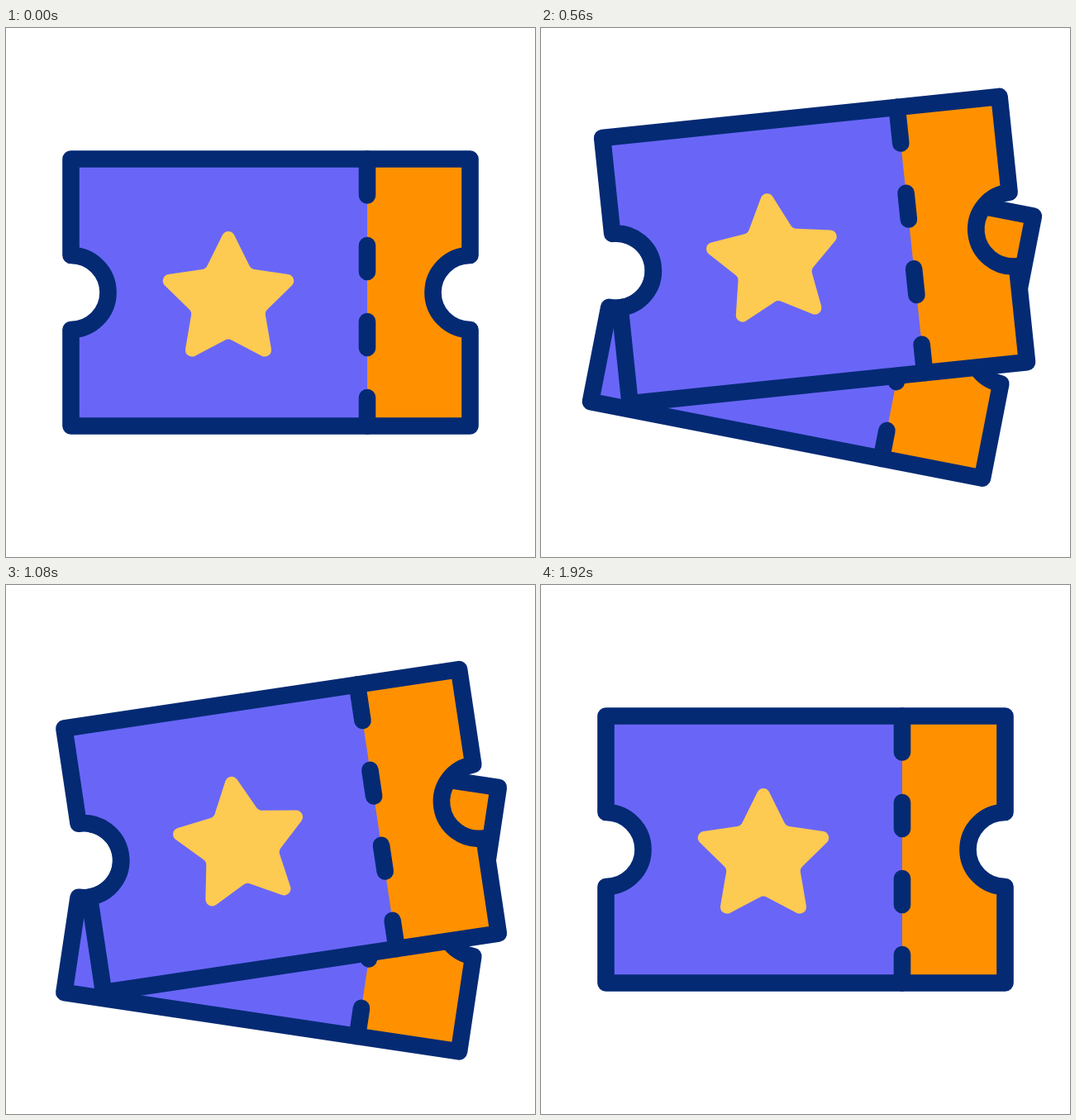
Recreate the animation shown at these times as an HTML page with a canvas. Size 640 by 640 pixels, loop 2000 ms.

```html
<!DOCTYPE html>
<html lang="en">
<head>
<meta charset="utf-8">
<title>Tickets</title>
<style>
html, body { margin: 0; width: 100%; height: 100%; overflow: hidden; background: #fff; }
canvas { display: block; width: 100vw; height: 100vh; }
</style>
</head>
<body>
<canvas id="stage" width="640" height="640"></canvas>
<script>
const ctx = document.getElementById('stage').getContext('2d');
const LOOP = 2000, STEP = 40, REST = 1920;
const NAVY = '#042a74', PURPLE = '#6966f7', ORANGE = '#ff9100', YELLOW = '#fdca52';
const RAD = Math.PI / 180;

// ticket geometry, centre lines of the outline
const MID = 320, L = 78.5, R = 561.5, T = 158.5, B = 481.5, SPLIT = 437, NOTCH = 45;
const FAN = 8.5;

// keys: [time, value]
const swing = [[0, 0], [440, -13], [720, 26.5], [1080, 0], [1440, 4.29], [1920, 0]];
const spread = [[0, 0], [400, 1], [1080, 1], [1480, 0]];
const driftX = [[0, 0], [440, 12.9], [680, 10.9], [920, 16.4], [1120, 14.7], [1240, 6.2], [1480, 0]];
const driftY = [[0, 0], [440, -14.8], [680, -13.8], [920, -2.8], [1120, 16], [1240, 12.8], [1480, 0]];

// Cubic through the keys; flat = eased stop at every key
function track(keys, t, flat) {
  const last = keys.length - 1;
  if (t >= keys[last][0]) return keys[last][1];
  const i = keys.findIndex(k => k[0] > t) - 1;
  const [t0, a] = keys[i], [t1, b] = keys[i + 1];
  const slope = j => flat || j === 0 || j === last ? 0
    : (keys[j + 1][1] - keys[j - 1][1]) / (keys[j + 1][0] - keys[j - 1][0]);
  const d = t1 - t0, u = (t - t0) / d, v = 1 - u;
  return a * v * v * (1 + 2 * u) + b * u * u * (3 - 2 * u)
    + d * u * v * (slope(i) * v - slope(i + 1) * u);
}

function spin(x, y, deg) {
  ctx.translate(x, y);
  ctx.rotate(deg * RAD);
  ctx.translate(-x, -y);
}

const body = new Path2D();
body.moveTo(L, T);
body.lineTo(R, T);
body.lineTo(R, MID - NOTCH);
body.arc(R, MID, NOTCH, -Math.PI / 2, Math.PI / 2, true);
body.lineTo(R, B);
body.lineTo(L, B);
body.lineTo(L, MID + NOTCH);
body.arc(L, MID, NOTCH, Math.PI / 2, -Math.PI / 2, true);
body.closePath();

const dashes = new Path2D();
for (const [from, to] of [[T, 202.5], [263, 295], [355, 387], [447, B]]) {
  dashes.moveTo(SPLIT, from);
  dashes.lineTo(SPLIT, to);
}

const star = new Path2D();
const point = i => {
  const r = i % 2 ? 46.5 : 93, a = (i * 36 - 90) * RAD;
  return [269 + r * Math.cos(a), 329 + r * Math.sin(a)];
};
const [p0, p1] = [point(0), point(1)];
star.moveTo((p0[0] + p1[0]) / 2, (p0[1] + p1[1]) / 2);
for (let i = 1; i <= 10; i++) star.arcTo(...point(i), ...point(i + 1), 8);
star.closePath();

function ticket(angle, starred) {
  ctx.save();
  spin(L, MID, angle);
  ctx.save();
  ctx.clip(body);
  ctx.fillStyle = PURPLE;
  ctx.fillRect(L, T, R - L, B - T);
  ctx.fillStyle = ORANGE;
  ctx.fillRect(SPLIT, T, R - SPLIT, B - T);
  ctx.restore();
  ctx.strokeStyle = NAVY;
  ctx.lineWidth = 20.6;
  ctx.lineCap = ctx.lineJoin = 'round';
  ctx.stroke(body);
  ctx.stroke(dashes);
  if (starred) {
    ctx.fillStyle = YELLOW;
    ctx.fill(star);
  }
  ctx.restore();
}

function draw(now) {
  const t = Math.min(REST, Math.floor((now % LOOP) / STEP) * STEP);
  const fan = FAN * track(spread, t, true);
  ctx.fillStyle = '#fff';
  ctx.fillRect(0, 0, 640, 640);
  ctx.save();
  ctx.translate(track(driftX, t), track(driftY, t));
  spin(MID, MID, track(swing, t, true));
  if (fan > 0) ticket(fan, false);
  ticket(-fan, true);
  ctx.restore();
}

let start;
function tick(now) {
  if (start === undefined) start = now;
  draw(Math.max(0, now - start));
  requestAnimationFrame(tick);
}
draw(0);
requestAnimationFrame(tick);
</script>
</body>
</html>
```
